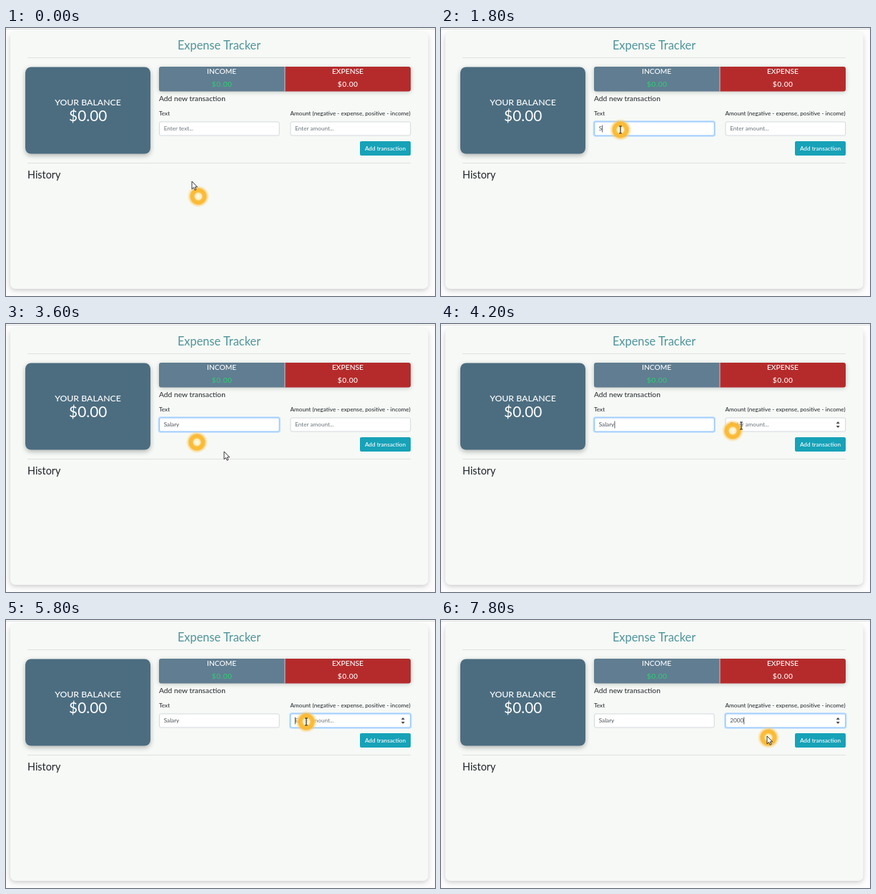
Write an HTML page that moves like this. It is 600 px wide and 374 px high and loops after 8 s.

```html
<!DOCTYPE html>
<html lang="en">
<head>
<meta charset="utf-8">
<title>Expense Tracker</title>
<style>
  html, body { margin: 0; width: 100%; height: 100%; overflow: hidden; background: #fbfcfb; }
  svg { display: block; width: 100%; height: 100%; }
  text { font-family: Lato, "Open Sans", sans-serif; font-size: 8.2px; fill: #212529; white-space: pre; }
  .h5 { font-size: 10.25px; }
  .mid { text-anchor: middle; }
  .white { fill: #fff; }
  .medium { font-weight: 500; }
  .money { letter-spacing: .5px; font-weight: 500; }
  .rule { stroke: #dfe2df; stroke-width: 1; }
  .field { fill: #fff; stroke: #ced4da; stroke-width: .9; }
  .glow { fill: #bfdeff; }
</style>
</head>
<body>
<svg viewBox="0 0 600 374" xmlns="http://www.w3.org/2000/svg">
  <defs>
    <filter id="soft" x="-20%" y="-20%" width="140%" height="140%">
      <feGaussianBlur stdDeviation="3.5"/>
    </filter>
    <radialGradient id="halo">
      <stop offset="0" stop-color="#fff8e2" stop-opacity=".8"/>
      <stop offset=".27" stop-color="#ffefc0" stop-opacity=".85"/>
      <stop offset=".4" stop-color="#fbbd3a"/>
      <stop offset=".68" stop-color="#fbb62c" stop-opacity=".95"/>
      <stop offset=".82" stop-color="#fcc95f" stop-opacity=".5"/>
      <stop offset="1" stop-color="#fdd98c" stop-opacity="0"/>
    </radialGradient>
  </defs>

  <rect width="600" height="374" fill="#fbfcfb"/>
  <path d="M0 1.5H600" stroke="#dcdedd"/>
  <rect x="6" y="9" width="584" height="357" rx="7" fill="#000" opacity=".2" filter="url(#soft)"/>
  <rect x="6" y="5" width="584.5" height="359" rx="7" fill="#f6f9f6"/>

  <text class="mid" x="298" y="30" style="font-size:16.4px;fill:#4f9499">Expense Tracker</text>
  <path class="rule" d="M30 41.5H566M30 188.5H566"/>

  <rect x="27" y="57" width="175" height="121" rx="8" fill="#000" opacity=".28" filter="url(#soft)"/>
  <rect x="27" y="54.5" width="175" height="121" rx="8" fill="#4c6d80"/>
  <text class="mid white medium" x="114.5" y="107.6" style="font-size:12.3px">YOUR BALANCE</text>
  <text class="mid white" x="114.7" y="130" style="font-size:20.8px">$0.00</text>

  <rect x="214" y="56" width="352" height="33" rx="3" fill="#000" opacity=".22" filter="url(#soft)"/>
  <path d="M390 54H217a3 3 0 0 0-3 3V85.500a3 3 0 0 0 3 3H390Z" fill="#607d91"/>
  <path d="M390 54H563a3 3 0 0 1 3 3V85.500a3 3 0 0 1-3 3H390Z" fill="#b52b2b"/>
  <path d="M390 54V88.500" stroke="#dee2e6" stroke-width=".8"/>
  <text class="h5 mid white medium" x="301.700" y="64.200">INCOME</text>
  <text class="h5 mid white medium" x="478" y="64.200">EXPENSE</text>
  <text class="h5 mid money" x="302.200" y="82" style="fill:#2ecc71">$0.00</text>
  <text class="h5 mid money white" x="478.200" y="82">$0.00</text>

  <text class="h5" x="214" y="102">Add new transaction</text>
  <text x="214" y="122.300">Text</text>
  <text x="397.500" y="122.300">Amount (negative - expense, positive - income)</text>
  <g id="fields"></g>
  <rect x="495" y="158" width="71" height="20" rx="2" fill="#17a2b8"/>
  <text class="mid white medium" x="530.500" y="171">Add transaction</text>
  <text x="30" y="210" style="font-size:14.400px">History</text>

  <circle id="ring" r="15.500" fill="url(#halo)"/>
  <path id="arrow" d="M0 0V10.800L2.500 8.500L4.200 12.300L5.900 11.500L4.300 7.900H7.600Z" fill="#fff" stroke="#222" stroke-width=".9" stroke-linejoin="round"/>
  <path id="beam" d="M-2-5H-.6L0-4.500L.6-5H2M0-4.500V4.500M-2 5H-.6L0 4.500L.6 5H2" fill="none" stroke="#222" stroke-width="1.100"/>
</svg>
<script>
const LOOP = 8000, STEP = 200;
const $ = id => document.getElementById(id);

function add(parent, tag, attrs) {
  const el = document.createElementNS("http://www.w3.org/2000/svg", tag);
  for (const k in attrs) el.setAttribute(k, attrs[k]);
  return parent.appendChild(el);
}

const show = (el, on) => el.setAttribute("visibility", on ? "visible" : "hidden");
const move = (el, [x, y]) => el.setAttribute("transform", `translate(${x} ${y})`);

// Each field: focus span, first key press, pace of typing
const fields = [
  { x: 214, hint: "Enter text...", value: "Salary", focus: 800, blur: 4400, type: 1800 },
  { x: 397.5, hint: "Enter amount...", value: "2000", focus: 4400, blur: LOOP, type: 6200, spin: true }
];

for (const f of fields) {
  const g = $("fields");
  f.glow = add(g, "rect", { class: "glow", x: f.x - 1.4, y: 129.3, width: 171.300, height: 22.400, rx: 3.500 });
  f.box = add(g, "rect", { class: "field", x: f.x + .5, y: 131, width: 167.700, height: 19, rx: 2 });
  f.text = add(g, "text", { x: f.x + 6.700, y: 143.400 });
  f.caret = add(g, "rect", { y: 135.500, width: .8, height: 10, fill: "#333" });
  if (f.spin) f.arrows = add(g, "path", { d: "M552.700 139L555.200 136L557.700 139ZM552.700 142L555.200 145L557.700 142Z", fill: "#444" });
}

// Pointer path: time, x, y
const path = [
  [-200, 269, 235], [0, 260, 214], [200, 254, 172], [400, 251, 142],
  [3200, 251, 142], [3400, 267, 165], [3600, 305, 178], [3800, 366, 168],
  [4000, 408, 149], [4200, 420, 142], [7200, 420, 142], [7400, 432, 150],
  [7600, 458, 164], [7800, 456, 162]
];

function pointer(t) {
  const i = path.findIndex(p => p[0] >= t);
  if (i < 1) return path[i < 0 ? path.length - 1 : 0].slice(1);
  const [t0, x0, y0] = path[i - 1], [t1, x1, y1] = path[i];
  const k = (t - t0) / (t1 - t0);
  return [x0 + (x1 - x0) * k, y0 + (y1 - y0) * k];
}

// The highlight pales shortly after each click
const ringAlpha = t => Math.min(1, ...[1000, 4600].map(c => .28 + Math.abs(t - c) / 500));

function drawField(f, t, [px, py]) {
  const focused = t >= f.focus && t < f.blur;
  const count = Math.max(0, Math.min(f.value.length, Math.floor((t - f.type) / STEP) + 1));
  const lastKey = count ? f.type + (count - 1) * STEP : f.focus;
  const hover = px > f.x && px < f.x + 168 && py > 131 && py < 150;

  f.text.textContent = count ? f.value.slice(0, count) : f.hint;
  f.text.style.fill = count ? "#495057" : "#6c757d";
  show(f.glow, focused);
  f.box.style.stroke = focused ? "#80bdff" : "#ced4da";
  show(f.caret, focused && (t - lastKey) % 1000 < 500);
  f.caret.setAttribute("x", f.x + 6.700 + (count ? f.text.getComputedTextLength() + .2 : -.3));
  if (f.arrows) show(f.arrows, focused || hover);
  return hover;
}

function draw(time) {
  const t = Math.floor(time % LOOP / STEP) * STEP;
  const pos = pointer(t);
  const over = fields.map(f => drawField(f, t, pos)).some(Boolean);
  move($("ring"), pointer(t - STEP));
  $("ring").setAttribute("opacity", ringAlpha(t));
  move($("arrow"), pos);
  move($("beam"), pos);
  show($("arrow"), !over);
  show($("beam"), over);
}

const start = performance.now();
function tick() {
  draw(performance.now() - start);
  requestAnimationFrame(tick);
}
tick();
</script>
</body>
</html>
```
